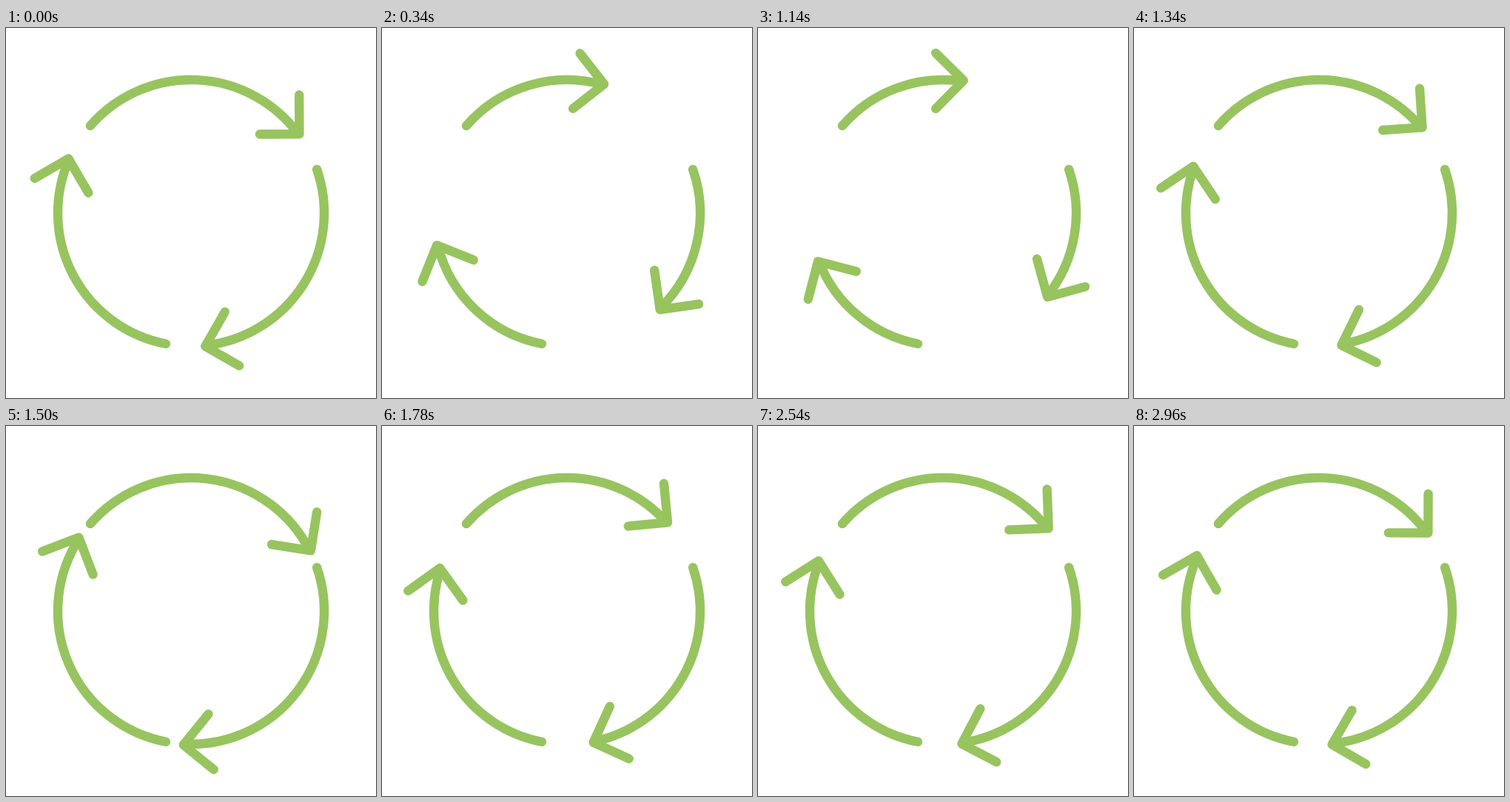
Recreate the animation shown at these times as an HTML page. Size 500 by 500 pixels, loop 2980 ms.

```html
<!DOCTYPE html>
<html lang="en">
<head>
<meta charset="utf-8">
<title>Cycle arrows</title>
<style>
  html, body { margin: 0; width: 100%; height: 100%; overflow: hidden; background: #fff; }
  svg { display: block; width: 100%; height: 100%; }
</style>
</head>
<body>
<svg viewBox="0 0 500 500">
  <defs>
    <g id="arrow">
      <path id="shaft"/>
      <path id="head" d="M343.5 144H397V91.2"/>
    </g>
  </defs>
  <g fill="none" stroke="#97c45f" stroke-width="12.4" stroke-linecap="round" stroke-linejoin="round">
    <use href="#arrow"/>
    <use href="#arrow" transform="rotate(120 250 250)"/>
    <use href="#arrow" transform="rotate(240 250 250)"/>
  </g>
</svg>
<script>
  const LOOP = 2980, PULL_END = 1000, RELEASE_END = 1350;
  const PULL = -48, RADIUS = 180;
  const TAIL = -139.1, TIP = -36.2;
  const shaft = document.getElementById('shaft');
  const head = document.getElementById('head');

  function point(degrees) {
    const a = degrees * Math.PI / 180;
    return `${(250 + RADIUS * Math.cos(a)).toFixed(2)} ${(250 + RADIUS * Math.sin(a)).toFixed(2)}`;
  }

  // Head angle relative to rest: pull back, snap forward, then a damped swing.
  function swing(t) {
    if (t < PULL_END) {
      const p = t / PULL_END;
      return PULL * (1 - (1 - p) ** 1.5 / (1 + 4.7 * p));
    }
    if (t < RELEASE_END) {
      const p = (t - PULL_END) / (RELEASE_END - PULL_END);
      return PULL * (1 - p ** 3.2);
    }
    const s = t - RELEASE_END;
    return 10.9 * Math.exp(-0.0012 * s) * Math.sin(Math.PI * s / 325);
  }

  function draw(t) {
    const angle = swing(t);
    shaft.setAttribute('d', `M${point(TAIL)}A${RADIUS} ${RADIUS} 0 0 1 ${point(TIP + angle)}`);
    head.setAttribute('transform', `rotate(${angle.toFixed(3)} 250 250)`);
  }

  const start = performance.now();
  function tick() {
    draw((performance.now() - start) % LOOP);
    requestAnimationFrame(tick);
  }
  draw(0);
  requestAnimationFrame(tick);
</script>
</body>
</html>
```
